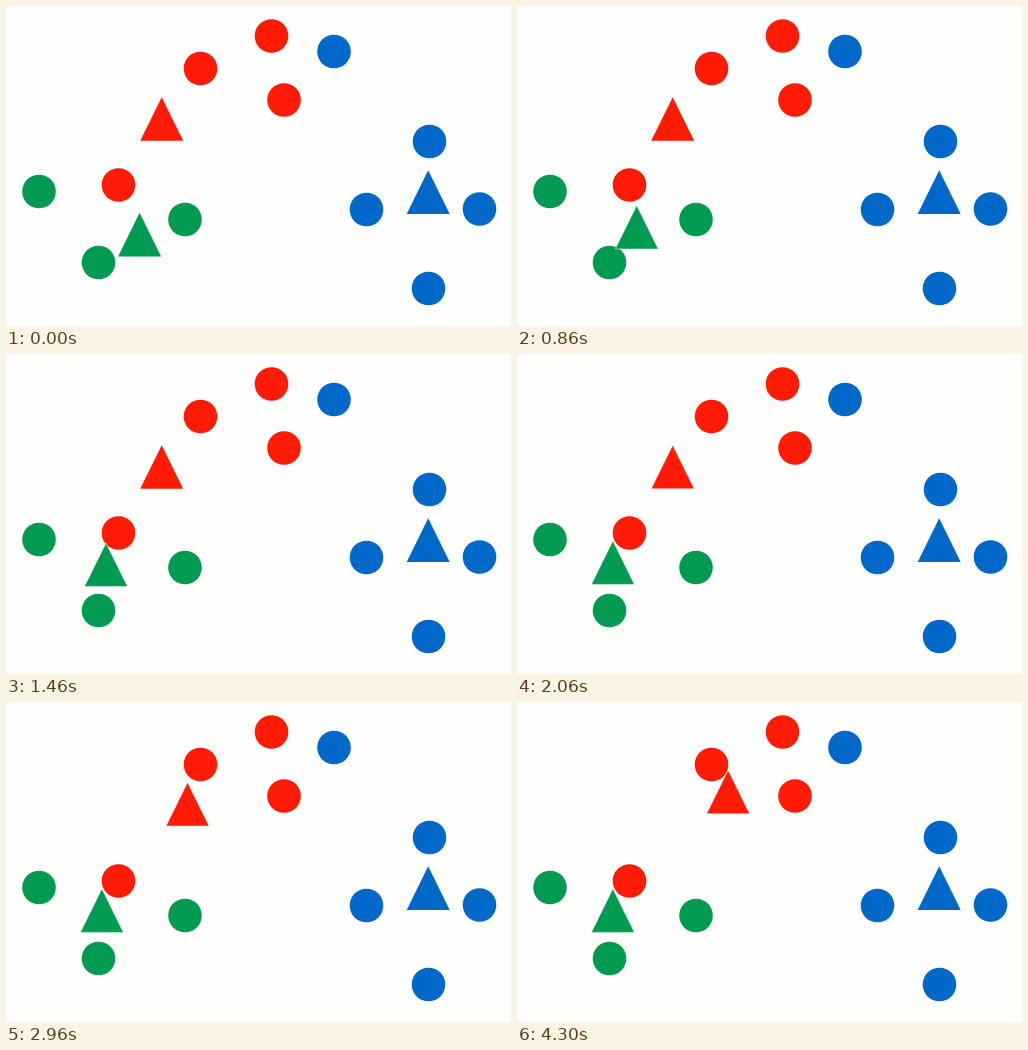
Write an HTML page that moves like this. It is 505 by 320 pixels and loops after 5 s.

```html
<!DOCTYPE html>
<html lang="en">
<head>
<meta charset="utf-8">
<title>Cluster centroids</title>
<style>
  html, body { margin: 0; width: 100%; height: 100%; overflow: hidden; background: #fefefc; }
  svg { display: block; width: 505px; height: 320px; }
  .red { fill: #ff1b05; }
  .green { fill: #009b50; }
  .blue { fill: #0068c8; }
  .moved { stroke: #fefefc; stroke-opacity: .5; stroke-width: 1; }
</style>
</head>
<body>
<svg id="stage" viewBox="0 0 505 320"></svg>
<script>
const LOOP = 5000, STEP = 1000 / 30, RADIUS = 16.8;

const points = {
  red: [[265.5, 30], [194.5, 62.5], [278, 94], [112.5, 179]],
  blue: [[328, 45.5], [423.5, 135.5], [360.5, 203.5], [473.5, 203], [422.5, 282.5]],
  green: [[33, 185.5], [179, 213.5], [92.5, 256.5]]
};

// Apex position, travel, start and duration in ms
const centroids = [
  { color: 'blue', x: 422.2, y: 164.3 },
  { color: 'green', x: 133.6, y: 206.8, dx: -37.7, dy: -20, start: 0, time: 2000 },
  { color: 'red', x: 155.7, y: 91.2, dx: 55.4, dy: -23, start: 2000, time: 2000 }
];

const stage = document.getElementById('stage');

function add(tag, attrs) {
  const el = document.createElementNS('http://www.w3.org/2000/svg', tag);
  for (const key in attrs) el.setAttribute(key, attrs[key]);
  return stage.appendChild(el);
}

for (const color in points)
  for (const [cx, cy] of points[color]) add('circle', { class: color, cx, cy, r: RADIUS });

for (const c of centroids)
  c.el = add('path', { class: c.color, d: 'M0 0L21.5 43.6H-21.5Z', transform: `translate(${c.x} ${c.y})` });

// Speed follows a raised cosine
const ease = x => x - Math.sin(2 * Math.PI * x) / (2 * Math.PI);

function draw(now) {
  // Steps of 30 per second, with start times cut to 10 ms
  const t = Math.floor((now % LOOP + 7) / STEP) * STEP;
  for (const c of centroids) {
    if (!c.time) continue;
    const x = Math.min(1, Math.max(0, (t - c.start) / c.time));
    const p = ease(x);
    c.el.setAttribute('transform', `translate(${c.x + c.dx * p} ${c.y + c.dy * p})`);
    c.el.classList.toggle('moved', x > 0);
  }
}

const begin = performance.now();
function tick() {
  draw(performance.now() - begin);
  requestAnimationFrame(tick);
}
tick();
</script>
</body>
</html>
```
